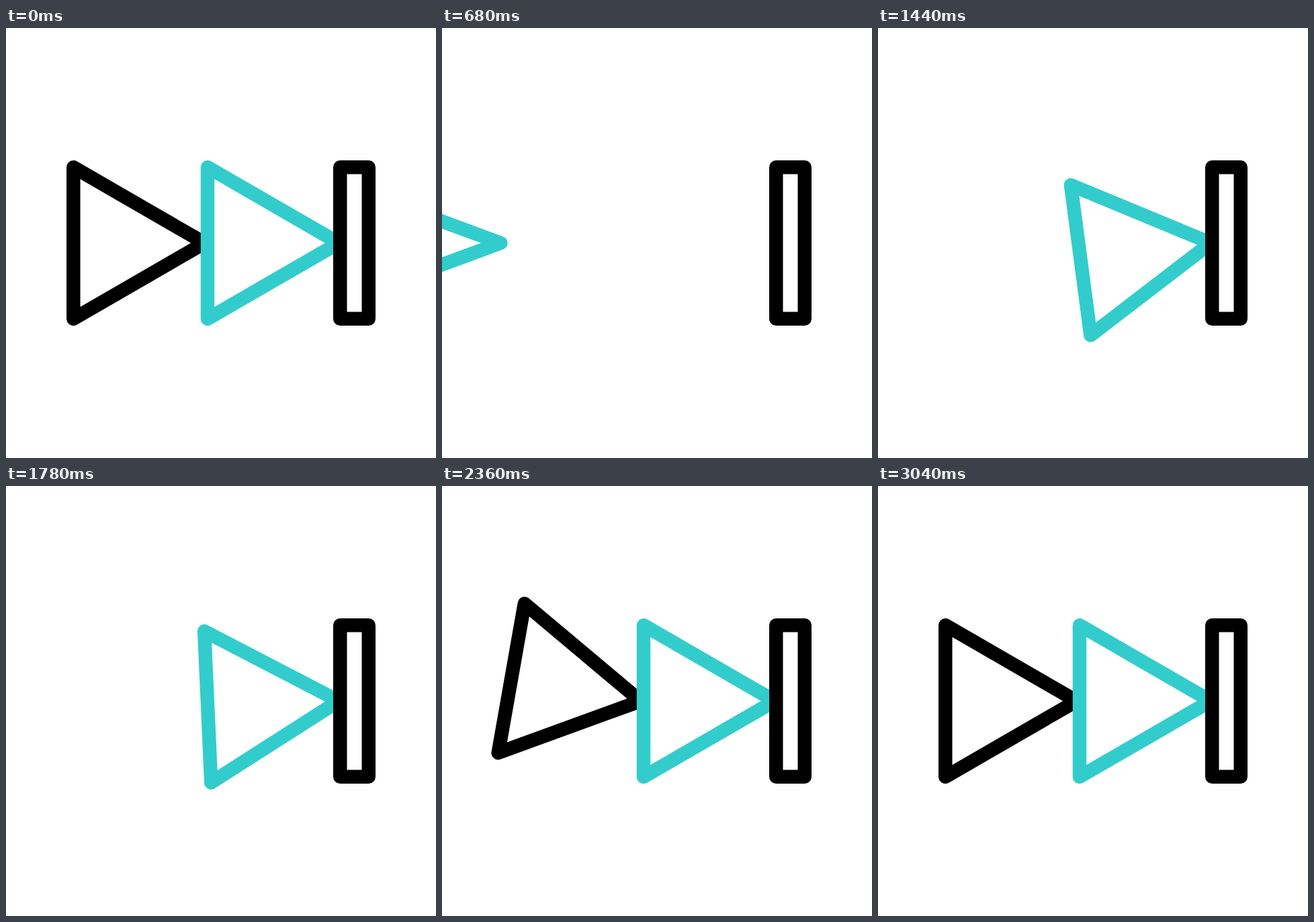
An HTML page for the animation above (3600 ms loop, 640x640 px).

```html
<!DOCTYPE html>
<html>
<head>
<meta charset="utf-8">
<style>
html, body { margin: 0; width: 100%; height: 100%; overflow: hidden; background: #fff; }
svg { display: block; width: 100vw; height: 100vh; }
path, rect { fill: none; stroke-width: 20.5; stroke-linejoin: round; }
</style>
</head>
<body>
<svg viewBox="0 0 640 640">
  <path id="black" stroke="#000"/>
  <path id="teal" stroke="#33cccc"/>
  <rect x="497.25" y="207.25" width="42.5" height="225.5" stroke="#000"/>
</svg>
<script>
const STEP = 20, LOOP = 3600;
const FADE_END = 25, HIT = 43;
const MID = 320, HALF = 112.8, LENGTH = 195.3;
const TRAVEL = 544, STRETCH = 147;

// [step, degrees] of the swing around the tip
const SWING = [[43, 0], [53, -15.8], [63, 15], [73, -10], [83, 6], [90, -4], [99, 0]];

const parts = [
  { el: document.getElementById('teal'), tip: 495.3, delay: 0 },
  { el: document.getElementById('black'), tip: 295.6, delay: 53 }
];

function swingAt(n) {
  for (let i = 1; i < SWING.length; i++) {
    const [a, from] = SWING[i - 1], [b, to] = SWING[i];
    if (n >= a && n < b) return from + (to - from) * (n - a) / (b - a);
  }
  return 0;
}

function pose(part, n) {
  const fading = n < FADE_END;
  const local = n - part.delay;
  const u = Math.min(1, Math.max(0, (local - FADE_END) / (HIT - FADE_END)));
  const away = fading ? 0 : 1 - u * u;
  const tip = part.tip - TRAVEL * away;
  const back = tip - LENGTH - STRETCH * away;
  const angle = fading ? 0 : swingAt(local);
  part.el.setAttribute('d', `M${back} ${MID - HALF}L${tip} ${MID}L${back} ${MID + HALF}Z`);
  part.el.setAttribute('transform', `rotate(${angle} ${tip} ${MID})`);
  part.el.setAttribute('opacity', fading ? 1 - n / FADE_END : 1);
}

const start = performance.now();
function draw() {
  const t = Math.max(0, performance.now() - start) % LOOP;
  const n = Math.floor(t / STEP);
  parts.forEach(p => pose(p, n));
  requestAnimationFrame(draw);
}
draw();
</script>
</body>
</html>
```
